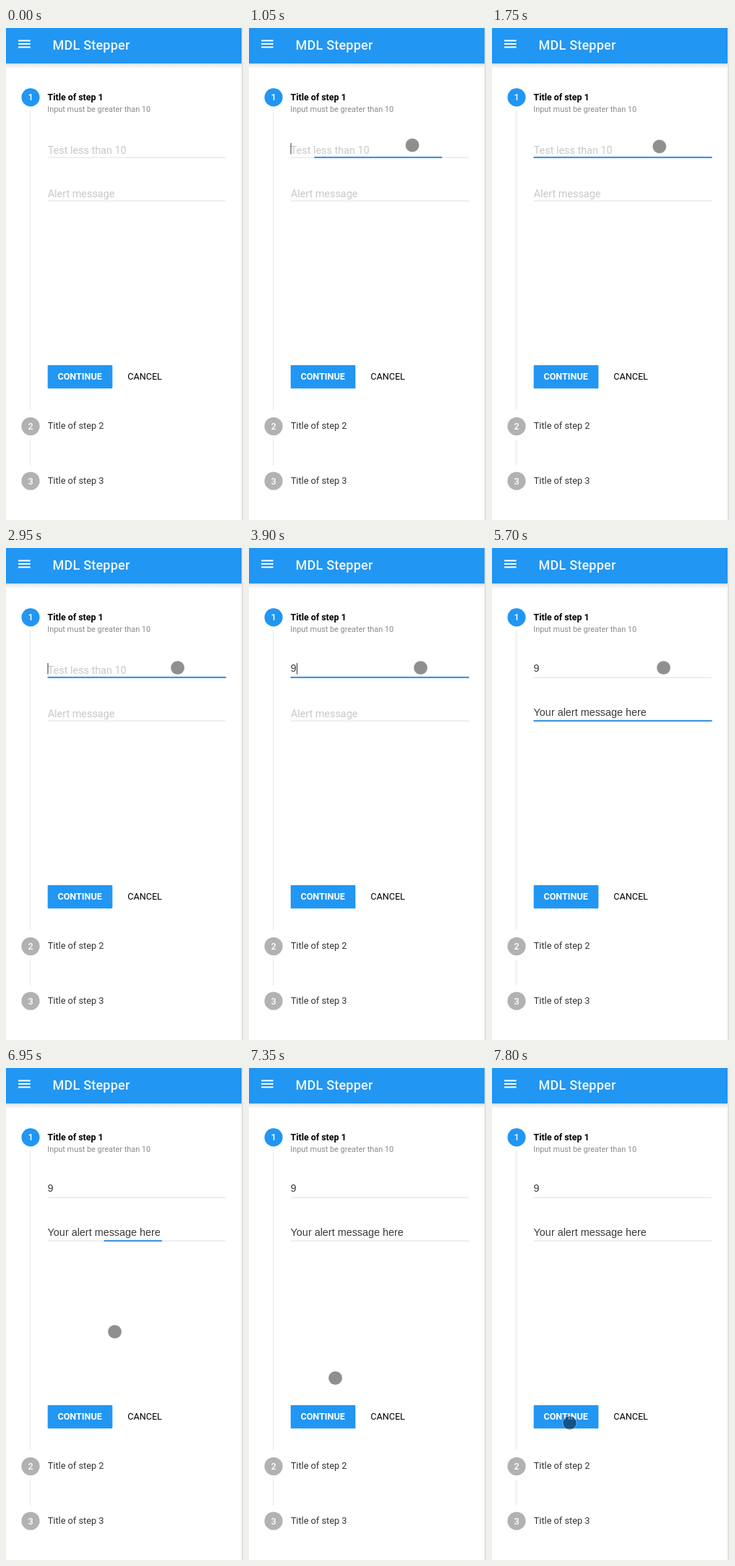
Write an HTML page that moves like this. It is 328 px wide and 680 px high and loops after 8 s.

```html
<!DOCTYPE html>
<html lang="en">
<head>
<meta charset="utf-8">
<title>Stepper</title>
<style>
  html, body { margin: 0; width: 100%; height: 100%; overflow: hidden; background: #fff; }
  svg { display: block; width: 328px; height: 680px; font: 12.6px Roboto, sans-serif; }
  .hint { font-size: 14.4px; fill: #c8c8c8; }
  .value { font: 14.4px "Liberation Sans", Arial, sans-serif; fill: #3a3a3a; }
  .num { fill: #fff; font-weight: 500; text-anchor: middle; }
  .step { font-size: 12.75px; fill: #333; }
  .rule { fill: #e0e0e0; }
  .bar { fill: #2d8cdc; }
  .caret { fill: #333; }
</style>
</head>
<body>
<svg viewBox="0 0 328 680">
  <linearGradient id="shade" x2="0" y2="1">
    <stop stop-color="#d4dbe2"/>
    <stop offset=".6" stop-color="#f2f4f5"/>
  </linearGradient>
  <rect width="326" height="49" fill="#2196f3"/>
  <rect y="49" width="326" height="6" fill="url(#shade)"/>
  <rect x="326" width="2" height="680" fill="#e0e0e0"/>
  <path d="M17 17.5h16.6M17 22h16.6M17 26.5h16.6" stroke="#fff" stroke-width="1.8"/>
  <text x="64.5" y="30" font-size="18" font-weight="500" letter-spacing=".22" fill="#f0f7fe">MDL Stepper</text>

  <path d="M33.5 114V528M33.5 569V605" stroke="#e6e6e6"/>
  <circle cx="34" cy="95.8" r="12.6" fill="#2196f3"/>
  <circle cx="34" cy="550.5" r="12.6" fill="#b2b2b2"/>
  <circle cx="34" cy="626" r="12.6" fill="#b2b2b2"/>
  <text class="num" x="34" y="100.2">1</text>
  <text class="num" x="34" y="555">2</text>
  <text class="num" x="34" y="630.5">3</text>
  <text x="57.5" y="100" font-size="12.4" font-weight="700">Title of step 1</text>
  <text x="57.3" y="116" font-size="10.88" fill="#8a8a8a">Input must be greater than 10</text>
  <text class="step" x="57.7" y="554">Title of step 2</text>
  <text class="step" x="57.7" y="630">Title of step 3</text>

  <g class="field">
    <text class="hint" x="57.7" y="174">Test less than 10</text>
    <text class="value" x="57.6" y="171.3">9</text>
    <rect class="rule" x="57.5" y="178.5" width="247" height="1"/>
    <rect class="bar" y="177.8" height="2"/>
    <rect class="caret" y="159" width="1" height="15.5"/>
  </g>
  <g class="field">
    <text class="hint" x="57.7" y="234">Alert message</text>
    <text class="value" x="57.6" y="231.7">Your alert message here</text>
    <rect class="rule" x="57.5" y="238.5" width="247" height="1"/>
    <rect class="bar" y="237.8" height="2"/>
    <rect class="caret" y="219" width="1" height="15.5"/>
  </g>

  <rect x="57.7" y="465.9" width="89.6" height="32.4" rx="1" fill="#2196f3"/>
  <text x="71.4" y="486" font-weight="700" fill="#fff">CONTINUE</text>
  <text x="168.3" y="486">CANCEL</text>

  <circle id="pointer" r="9.6" fill="#000" fill-opacity=".44" stroke="#fff" stroke-opacity=".4"/>
</svg>
<script>
const LOOP = 8000, STEP = 50, BLINK = 525;
const pointer = document.getElementById('pointer');

const moves = [
  { from: 1600, to: 1900, dx: 11.5, dy: 3.5 },
  { from: 6050, to: 6250, dx: -87, dy: 199 },
  { from: 7000, to: 7350, dx: -31, dy: 64 },
  { from: 7350, to: 7800, dx: -12, dy: 62 }
];
const fields = [
  { focus: 850, typed: 3900, blur: 4400, end: 66, open: [1000, 1150], close: [4650, 4700] },
  { focus: 4500, typed: 5150, blur: 6900, end: 213.5, open: [4650, 4700], close: [6900, 7050] }
];
document.querySelectorAll('.field').forEach((g, i) => {
  for (const part of ['hint', 'value', 'bar', 'caret'])
    fields[i][part + 'El'] = g.querySelector('.' + part);
});

const ramp = (t, from, to) => Math.min(1, Math.max(0, (t - from) / (to - from)));
const easeOut = p => 1 - (1 - p) ** 3;

function show(el, on) {
  el.setAttribute('visibility', on ? 'visible' : 'hidden');
}

function drawField(f, t) {
  const typed = t >= f.typed;
  show(f.hintEl, !typed);
  show(f.valueEl, typed);

  // Typing restarts the blink.
  const since = t - (typed ? f.typed : f.focus);
  show(f.caretEl, since >= 0 && t < f.blur && since % (2 * BLINK) < BLINK);
  f.caretEl.setAttribute('x', typed ? f.end : 57.5);

  // The bar opens from a 10px stub left of the middle.
  const open = easeOut(ramp(t, ...f.open)) - easeOut(ramp(t, ...f.close));
  show(f.barEl, open > 0);
  f.barEl.setAttribute('x', 168.5 - 111 * open);
  f.barEl.setAttribute('width', 10 + 237 * open);
}

function draw(now) {
  const t = Math.floor(now % LOOP / STEP) * STEP;
  fields.forEach(f => drawField(f, t));

  let x = 226, y = 162;
  for (const m of moves) {
    const p = ramp(t, m.from, m.to);
    x += m.dx * p;
    y += m.dy * p;
  }
  show(pointer, t >= 750);
  pointer.setAttribute('cx', x);
  pointer.setAttribute('cy', y);
}

let start;
function tick(now) {
  start ??= now;
  draw(now - start);
  requestAnimationFrame(tick);
}
requestAnimationFrame(tick);
</script>
</body>
</html>
```
